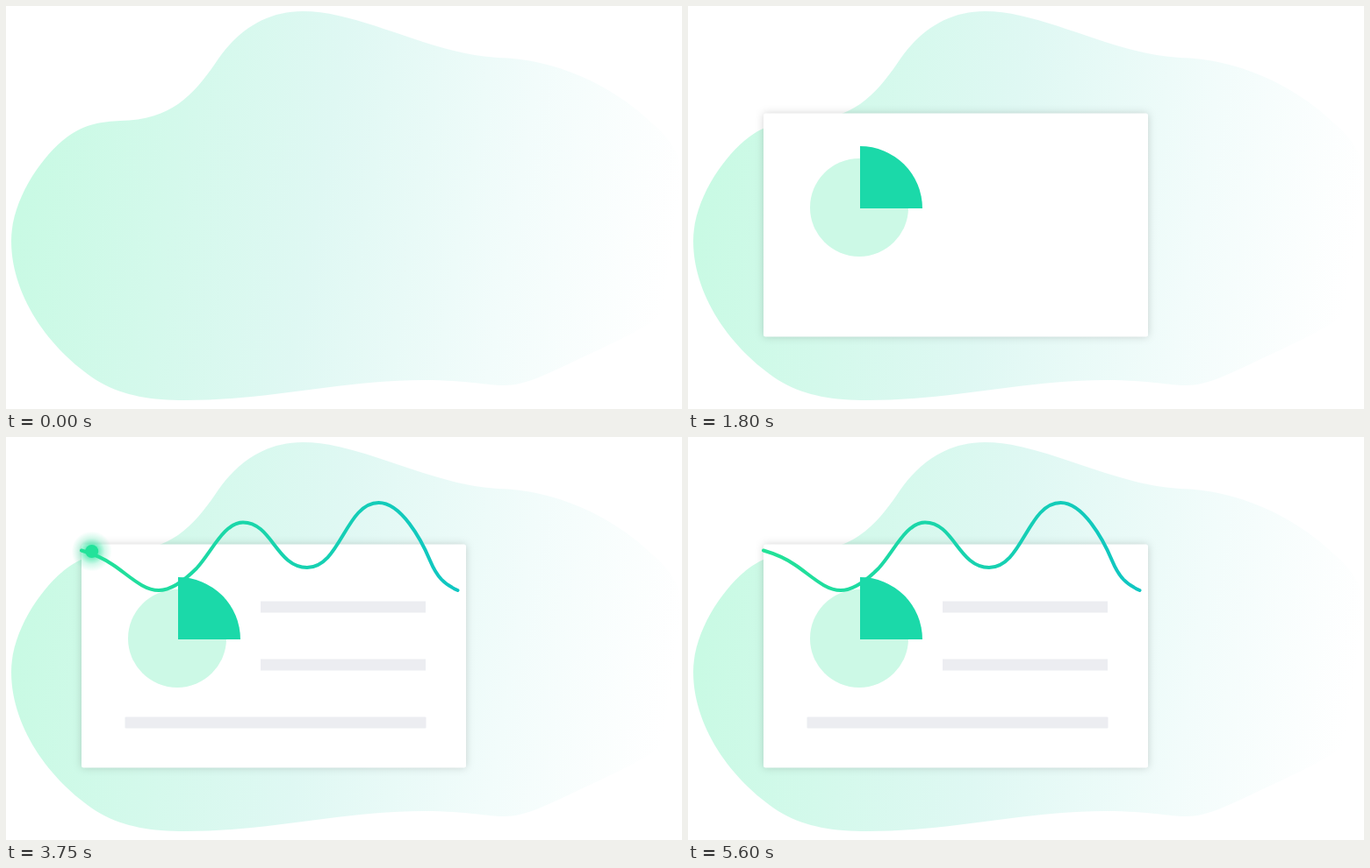
Animation of 770 by 460 pixels, one loop 6 s. Source, as an HTML page:

```html
<!DOCTYPE html>
<html lang="en">
<head>
<meta charset="utf-8">
<title>Report card</title>
<style>
html, body { margin: 0; width: 100%; height: 100%; overflow: hidden; background: #fff; }
svg { display: block; width: 770px; height: 460px; }
#card { filter: drop-shadow(0 0 5px rgba(0, 0, 0, .17)); }
</style>
</head>
<body>
<svg viewBox="0 0 770 460">
  <defs>
    <linearGradient id="mint" gradientUnits="userSpaceOnUse" x1="20" y1="215" x2="750" y2="335">
      <stop offset="0" stop-color="#c9fae4"/>
      <stop offset=".45" stop-color="#dff8f3"/>
      <stop offset=".75" stop-color="#f2fcfb"/>
      <stop offset="1" stop-color="#fff"/>
    </linearGradient>
    <linearGradient id="teal" gradientUnits="userSpaceOnUse" x1="86" y1="0" x2="515" y2="0">
      <stop offset="0" stop-color="#23e297"/>
      <stop offset="1" stop-color="#0fc6c2"/>
    </linearGradient>
    <radialGradient id="glow">
      <stop offset=".33" stop-color="#22e29a" stop-opacity=".62"/>
      <stop offset=".65" stop-color="#22e29a" stop-opacity=".2"/>
      <stop offset="1" stop-color="#22e29a" stop-opacity="0"/>
    </radialGradient>
  </defs>
  <path fill="url(#mint)" d="M6 268C6 222 40 172 69 150C90 134 110 132 130 131C188 130 213 102 238 66C262 29 295 6 338 6C405 6 480 54 560 59C625 60 690 90 735 133C760 155 773 172 773 225C773 275 766 325 754 344C742 363 690 385 640 409C612 422 590 433 568 433C548 433 525 427 475 427C385 427 300 450 205 450C165 450 135 445 108 430C55 398 6 335 6 268Z"/>
  <rect id="card" x="86" y="122.5" width="438" height="255" rx="2.5" fill="#fff"/>
  <circle id="disc" cx="195" cy="230" r="56" fill="#ccf9e6"/>
  <g fill="#ecedf1">
    <rect id="bar1" x="290" y="187.5" width="188" height="13"/>
    <rect id="bar2" x="290" y="253.5" width="188" height="13"/>
    <rect id="bar3" x="135.5" y="319.5" width="343" height="13" rx="1"/>
  </g>
  <path id="curve" fill="none" stroke="url(#teal)" stroke-width="4" stroke-linecap="round" d="M86 129.5C98 133 112 139 122 146C140 158 156 175 174 175C190 175 207 160 217 150C234 132 248 97.5 270 97.5C303 97.5 308 149 343 149C381 149 387 75 424.5 75C450 75 473 117 483 141C491 160 499 168 514.5 175"/>
  <g id="dot">
    <circle r="23" fill="url(#glow)"/>
    <circle r="7.5" fill="#22e29a"/>
  </g>
  <path id="slice" fill="#1bd9a9" d="M196 231V160A71 71 0 0 1 267 231Z"/>
</svg>
<script>
const LOOP = 6000;
const $ = id => document.getElementById(id);
const progress = (t, from, to) => Math.max(0, Math.min(1, (t - from) / (to - from)));

function place(id, x, y, opacity) {
  $(id).setAttribute('transform', `translate(${x} ${y})`);
  $(id).style.opacity = opacity;
}

// Fade in while dropping into place
function enter(id, t, from, duration, drop = 0, fade = duration) {
  const p = progress(t, from, from + duration);
  place(id, 0, -drop * (1 - p), progress(t, from, from + fade));
}

// The dot rides the curve: slow, fast across the middle, slow again
function ride(t) {
  const length = 144 * progress(t, 3690, 4400)
    + 251 * progress(t, 4400, 5050)
    + 115 * progress(t, 5050, 5600);
  const { x, y } = $('curve').getPointAtLength(length);
  place('dot', x, y - 3, t < 3690 ? 0 : 1 - progress(t, 5450, 5600));
}

function draw(t) {
  enter('card', t, 385, 815, 70, 710);
  enter('disc', t, 1200, 440);
  enter('slice', t, 1630, 170);
  enter('bar1', t, 2210, 190, 12);
  enter('bar2', t, 2510, 190, 12);
  enter('bar3', t, 3130, 190, 12);
  enter('curve', t, 3120, 570, 55);
  ride(t);
}

const start = performance.now();
function tick() {
  draw((performance.now() - start) % LOOP);
  requestAnimationFrame(tick);
}
tick();
</script>
</body>
</html>
```
